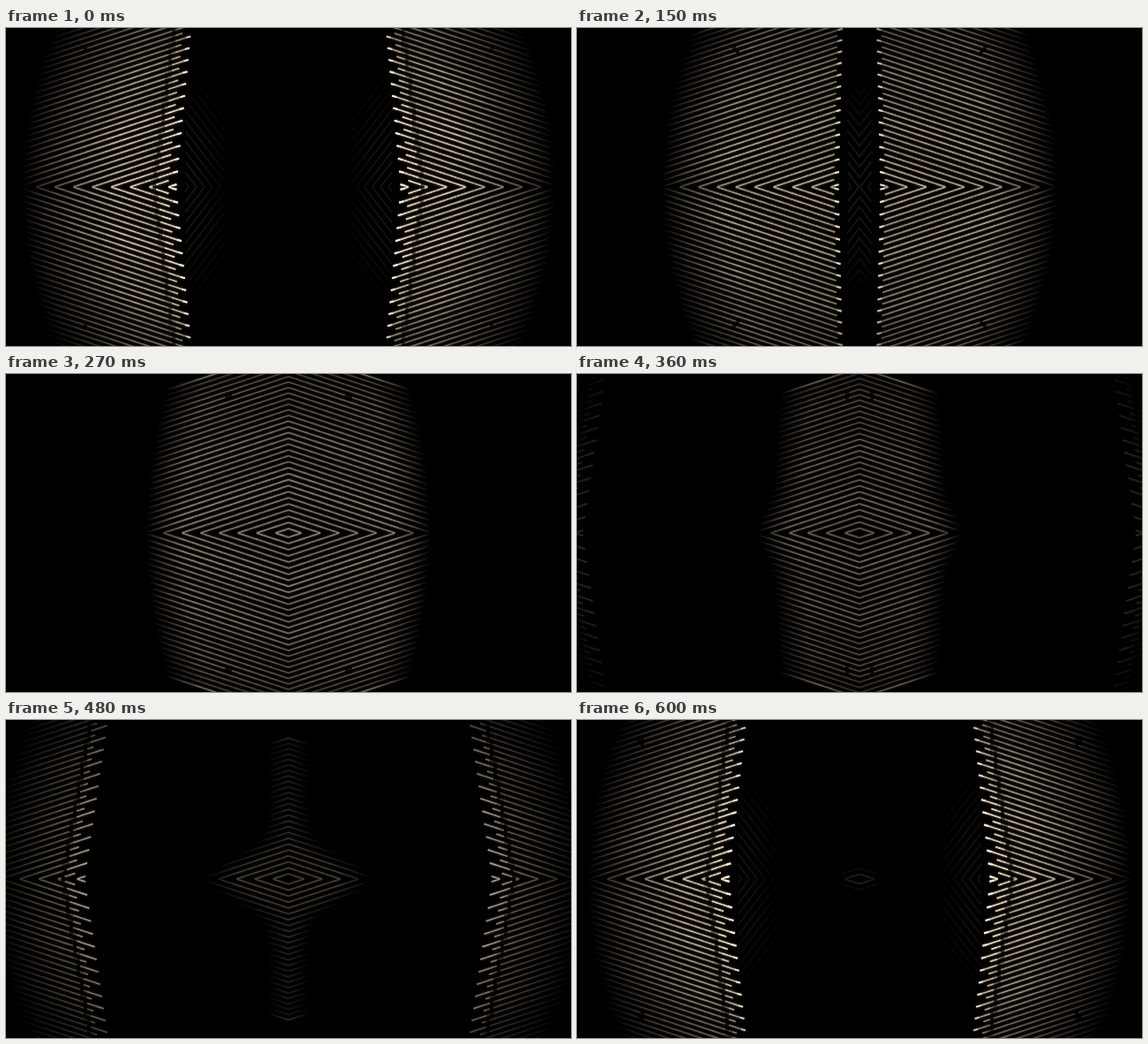
An HTML page with a canvas for the animation above (0.63 s loop, 640 px wide and 360 px high).

```html
<!DOCTYPE html>
<html lang="en">
<head>
<meta charset="utf-8">
<title>Mirrored ridges</title>
<style>
  html, body { margin: 0; width: 100%; height: 100%; overflow: hidden; background: #000; }
  canvas { display: block; width: 640px; height: 360px; }
</style>
</head>
<body>
<canvas id="stage" width="640" height="360"></canvas>
<script>
const LOOP = 630, STEP = 30, W = 320, H = 180;
const SLOPE = 0.33, LAST = 34;
const CREAM = '#efe1cd', BROWN = '#9a7857', TIP = '#fff6e8';

const stage = document.getElementById('stage').getContext('2d');
const quad = document.createElement('canvas');
quad.width = W;
quad.height = H;
const ctx = quad.getContext('2d');

const clamp = (n, lo = 0, hi = 1) => Math.min(hi, Math.max(lo, n));

// One plate: it enters at the side, is brightest at age 0 and dies out past the middle
function plate(age) {
  const late = Math.max(0, age - 360);
  const thin = Math.max(0, age - 240);
  return {
    age,
    edge: 193 + 0.69 * age,
    lean: clamp(17 - 0.085 * age, 0, 26),
    tail: 18 + (age < 0 ? 0.2 : 0.52) * Math.min(age, 360) + 0.0015 * late * late,
    bend: 36 * clamp((420 - age) / 200),
    waist: 0.0012 * thin * thin,
    fade: clamp(110 - 0.25 * age, 35, 110),
    light: age < 0 ? clamp(1 + age / 400) : clamp(1.05 - 0.0016 * age, 0.25, 1),
    groove: clamp(0.65 - age / 160, 0, 0.9)
  };
}

function segment(x0, y0, x1, y1, width, colour, alpha) {
  if (alpha < 0.008) return;
  ctx.strokeStyle = colour;
  ctx.globalAlpha = Math.min(1, alpha);
  ctx.lineWidth = width;
  ctx.beginPath();
  ctx.moveTo(x0, H - y0);
  ctx.lineTo(x1, H - y1);
  ctx.stroke();
}

// Light on the plate at x and height y above the axis
function shade(p, x, y) {
  const v = clamp(y / H);
  const tail = p.tail + p.bend * v * v + p.waist * (1 - Math.exp(-((v / 0.18) ** 2)));
  let a = p.light * (1 - 0.5 * v * v) * clamp((x - tail) / p.fade) ** 0.85;
  const d = x - (p.edge + p.lean * v - 25 + 6 * v);
  if (d > 0) a *= 1 + 0.4 * p.groove;
  a *= 1 - p.groove * Math.exp(-d * d / 7);
  const hole = Math.hypot(x - 90 - 0.6 * p.age, y - 155);
  return hole < 4 ? a * 0.25 : a;
}

function ridges(p) {
  for (let k = 0; k <= LAST; k++) {
    const h = 3 + 7.2 * k - 0.018 * k * k;
    const yAt = x => h + SLOPE * (x - p.edge);
    const tipY = h / (1 - SLOPE * p.lean / H);
    const tip = p.edge + p.lean * tipY / H;
    const tooth = k % 2 === 0;
    const end = Math.min(W, tooth ? tip : tip - 4 - p.lean / 3);
    const gain = k === LAST ? 1.6 : 0.93 + 0.07 * Math.sin(k * 7);
    for (let x = Math.max(0, p.edge - h / SLOPE); x < end; x += 4) {
      const x1 = Math.min(end, x + 4);
      const y = yAt(x), y1 = yAt(x1);
      if (y > H + 3) break;
      const a = gain * shade(p, (x + x1) / 2, (y + y1) / 2);
      segment(x, y, x1, y1, 5, BROWN, a * 0.2);
      segment(x, y, x1, y1, 1.7, CREAM, a * 0.9);
    }
    if (tooth && tip < W + 6) {
      const a = clamp(1 + p.age / 150) * shade(p, tip, tipY);
      segment(tip - 5, yAt(tip - 5), tip, yAt(tip) - 0.4, 2, TIP, a);
    }
  }
}

// Dim reflection ahead of the edge
function reflection(p) {
  const power = clamp((p.age + 120) / 120) * 0.17;
  if (!power || p.edge > W) return;
  for (let apex = p.edge + 14; apex < p.edge + 160; apex += 9) {
    for (let x = p.edge + 10; x < Math.min(apex, p.edge + 58); x += 5) {
      const x1 = Math.min(apex, x + 5);
      const y = (apex - x) * 1.3;
      const a = power * clamp((p.edge + 62 - x) / 40) * clamp((135 - y) / 80);
      segment(x, y, x1, (apex - x1) * 1.3, 1.8, BROWN, a);
    }
  }
}

function draw(t) {
  ctx.globalAlpha = 1;
  ctx.fillStyle = '#000';
  ctx.fillRect(0, 0, W, H);
  for (const age of [t - LOOP, t, t + LOOP]) {
    const p = plate(age);
    reflection(p);
    ridges(p);
  }
  for (const sx of [1, -1]) {
    for (const sy of [1, -1]) {
      stage.setTransform(sx, 0, 0, sy, W, H);
      stage.drawImage(quad, -W, -H);
    }
  }
}

let shown = -1;
function tick() {
  const t = Math.floor(performance.now() % LOOP / STEP) * STEP;
  if (t !== shown) draw(shown = t);
  requestAnimationFrame(tick);
}
tick();
</script>
</body>
</html>
```
